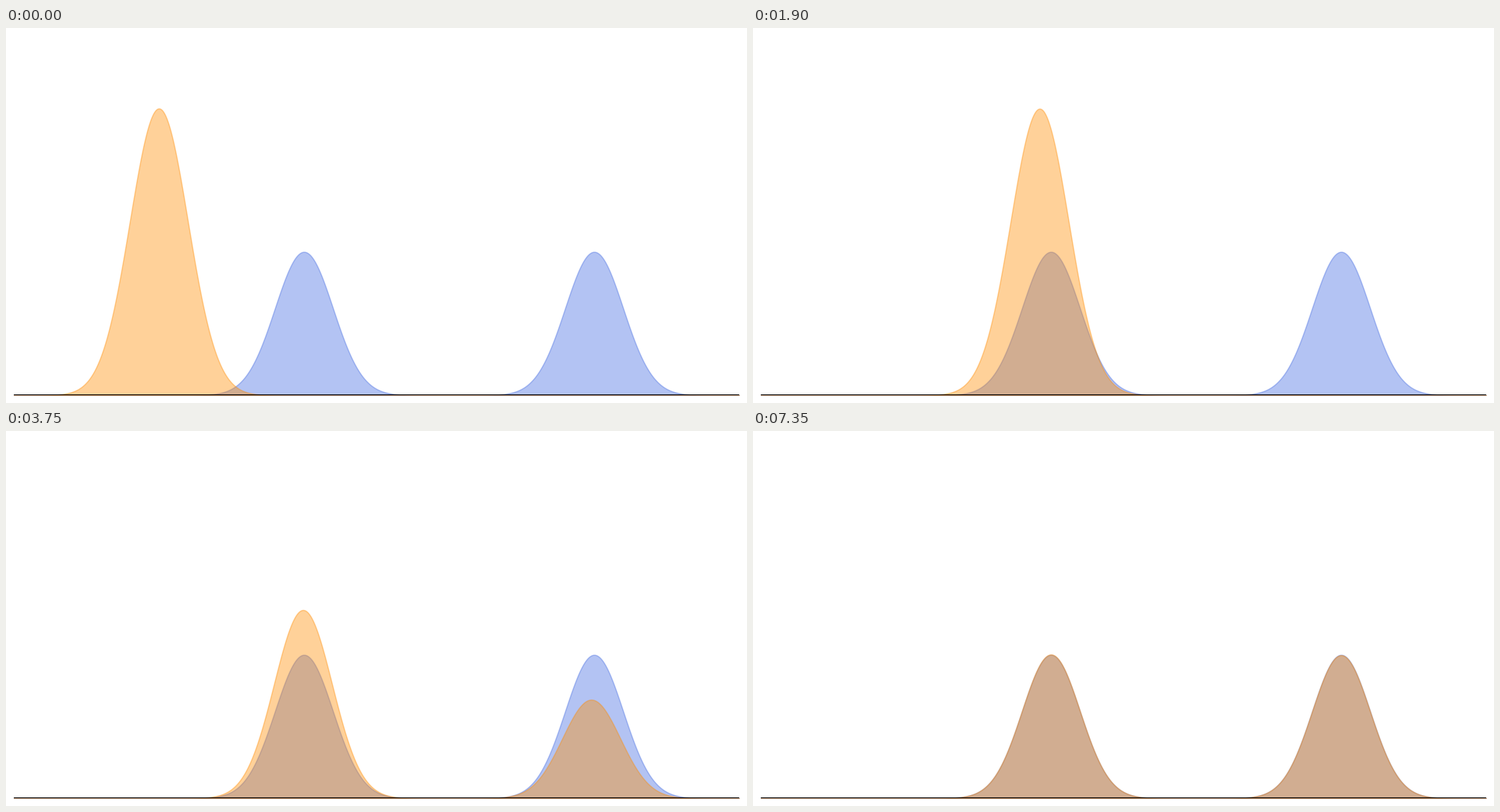
Recreate the animation shown at these times as a matplotlib script. Size 950x482 px, loop 7.5 s.

```python
import numpy as np
import matplotlib.pyplot as plt
from matplotlib.animation import FuncAnimation

W, H, DPI, PAD = 950, 482, 100, 10
FRAMES, INTERVAL = 150, 50
T_END = 10

x = np.linspace(0, 25, 1000)
dx = x[1] - x[0]


def log_normal(mean):
    return -0.5 * (x - mean) ** 2 - 0.5 * np.log(2 * np.pi)


log_start = log_normal(5)
log_goal = np.logaddexp(log_normal(10), log_normal(20)) - np.log(2)


def density(t):
    """Normalised geometric path from the start to the goal density."""
    a = np.exp(-t)
    log_p = a * log_start + (1 - a) * log_goal
    p = np.exp(log_p - log_p.max())
    return p / (p.sum() * dx)


def outline(y):
    top = np.column_stack([x, y])
    base = np.column_stack([x, np.zeros_like(x)])
    return np.vstack([top, base[::-1]])


def area(y, color):
    return ax.fill_between(x, y, color=color, alpha=0.4, linewidth=1)


fig = plt.figure(figsize=(W / DPI, H / DPI), dpi=DPI, facecolor="white")
ax = fig.add_axes([PAD / W, PAD / H, 1 - 2 * PAD / W, 1 - 2 * PAD / H])
ax.set(xlim=(0, 25), ylim=(0, 0.5))
ax.axis("off")

area(np.exp(log_goal), "royalblue")
flow = area(density(0), "darkorange")
ax.axhline(0, color="black", linewidth=1.5)


def update(i):
    flow.set_verts([outline(density(T_END * i / (FRAMES - 1)))])
    return [flow]


anim = FuncAnimation(fig, update, frames=FRAMES, interval=INTERVAL,
                     init_func=lambda: [flow], repeat=True, repeat_delay=0)
plt.show()
```
